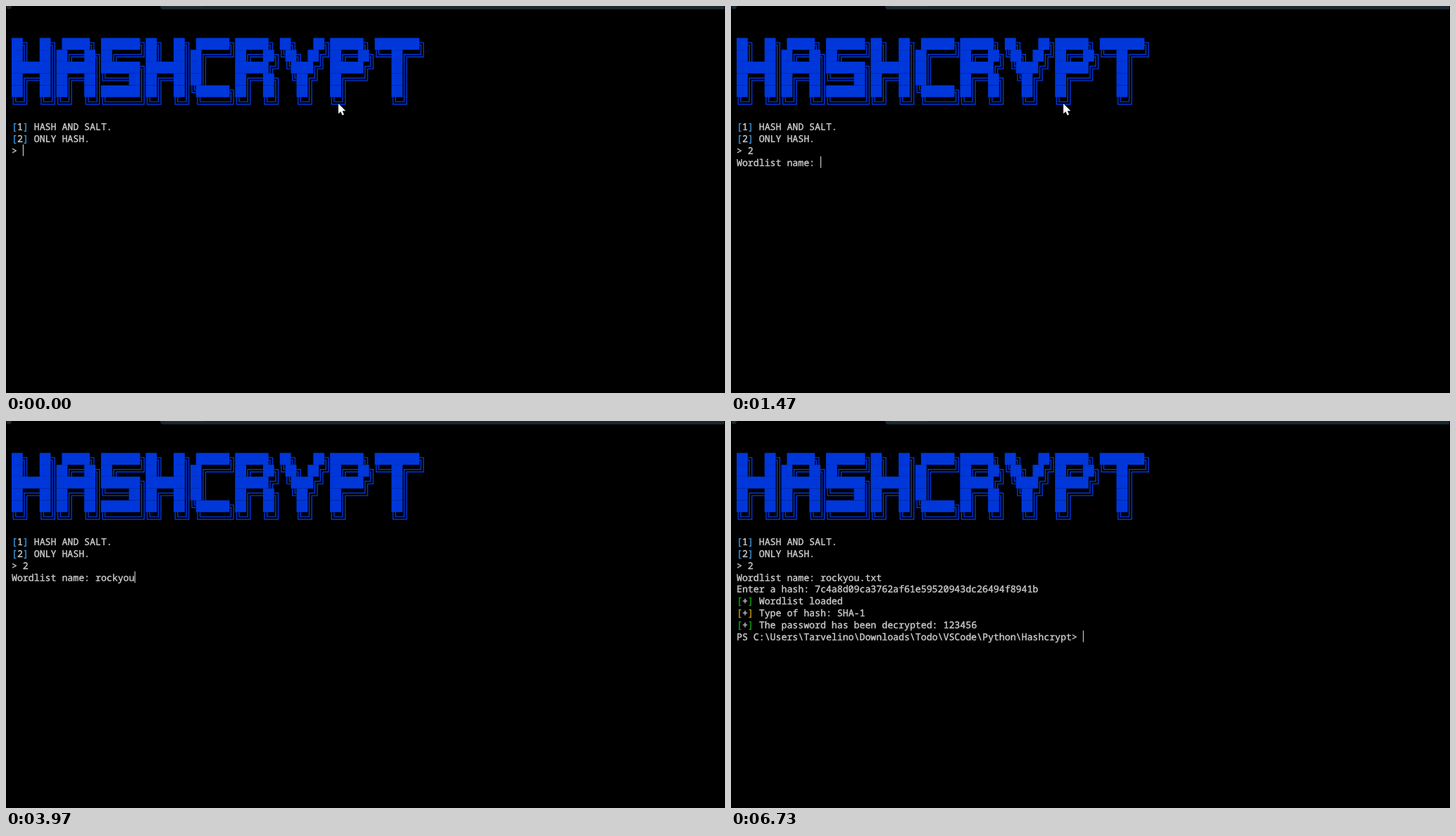
An HTML page for the animation above (6.76 s loop, 1021 by 549 pixels).

```html
<!DOCTYPE html>
<html lang="en">
<head>
<meta charset="utf-8">
<title>Terminal</title>
<style>
html, body { margin: 0; width: 100%; height: 100%; overflow: hidden; background: #000; }
svg { display: block; width: 1021px; height: 549px; }
text {
  font: 500 13.22px "Noto Sans Mono", "DejaVu Sans Mono", monospace;
  font-variant-ligatures: none;
  white-space: pre;
  text-rendering: geometricPrecision;
  fill: #ccc;
  stroke: #ccc;
  stroke-width: .4px;
}
</style>
</head>
<body>
<svg id="stage" viewBox="0 0 1021 549">
  <rect width="1021" height="549"/>
  <path d="M1 0H8Q8 4.5 4 4.5Q1 4.5 1 2ZM219 0H1020V4.8H223Q219 4.8 219 0Z" fill="#1b282d"/>
  <path d="M226 .5H279" stroke="#2c3335"/>
  <g id="banner" fill="#0037da"></g>
  <g id="lines"></g>
  <rect id="caret" width="1.1" height="16.4" fill="#d4d4d4"/>
  <path id="pointer" d="M0 0V14.2L3.3 11.2L5.6 16.6L8 15.5L5.7 10.3H10.2Z"
        fill="#fff" stroke="#000" stroke-width=".8" paint-order="stroke"/>
</svg>
<script>
const LOOP = 6760;
const LEFT = 8, TOP = 45.3, CELL_W = 7.932, CELL_H = 16.8;
const FIRST_ROW = 7, BASELINE = 13.3;

const BANNER = [
  "██╗  ██╗ █████╗ ███████╗██╗  ██╗ ██████╗██████╗ ██╗   ██╗██████╗ ████████╗",
  "██║  ██║██╔══██╗██╔════╝██║  ██║██╔════╝██╔══██╗╚██╗ ██╔╝██╔══██╗╚══██╔══╝",
  "███████║███████║███████╗███████║██║     ██████╔╝ ╚████╔╝ ██████╔╝   ██║",
  "██╔══██║██╔══██║╚════██║██╔══██║██║     ██╔══██╗  ╚██╔╝  ██╔═══╝    ██║",
  "██║  ██║██║  ██║███████║██║  ██║╚██████╗██║  ██║   ██║   ██║        ██║",
  "╚═╝  ╚═╝╚═╝  ╚═╝╚══════╝╚═╝  ╚═╝ ╚═════╝╚═╝  ╚═╝   ╚═╝   ╚═╝        ╚═╝"
];
// Direction of each corner's arms: [horizontal, vertical]
const CORNERS = { "╔": [1, 1], "╗": [-1, 1], "╚": [1, -1], "╝": [-1, -1] };
const LINE_GAP = 1.8;

const CYAN = "#3a96dd", GREEN = "#13a10e", YELLOW = "#c19c00";
const BRACKETS = [CYAN, CYAN, , , , GREEN, YELLOW, GREEN];

// Text added to the terminal: [time, text, ms per character]
const OUTPUT = [
  [0, "[1] HASH AND SALT.\n[2] ONLY HASH.\n> "],
  [910, "2"],
  [1180, "\nWordlist name: "],
  [3240, "rockyou.txt", 110],
  [4690, "\nEnter a hash: "],
  [5760, "7c4a8d09ca3762af61e59520943dc26494f8941b"],
  [6000, "\n"],
  [6060, "[+] Wordlist loaded\n"],
  [6120, "[+] Type of hash: SHA-1\n"],
  [6240, "[+] The password has been decrypted: 123456\n"],
  [6400, "PS C:\\Users\\Tarvelino\\Downloads\\Todo\\VSCode\\Python\\Hashcrypt> "]
];
const POINTER = { from: [472, 138.5], to: [407.7, 302.5], start: 1560, end: 2000, hide: 3240 };

const byId = id => document.getElementById(id);
const cellX = col => LEFT + col * CELL_W;
const cellY = row => TOP + row * CELL_H;

function add(parent, tag, attrs, content = "") {
  const node = document.createElementNS("http://www.w3.org/2000/svg", tag);
  for (const key in attrs) node.setAttribute(key, attrs[key]);
  node.textContent = content;
  return parent.appendChild(node);
}

function boxPath(char, x, y) {
  const cx = x + CELL_W / 2, cy = y + CELL_H / 2;
  return [-LINE_GAP, LINE_GAP].map(d => {
    if (char === "═") return `M${x} ${cy + d}h${CELL_W}`;
    if (char === "║") return `M${cx + d} ${y}v${CELL_H}`;
    const [h, v] = CORNERS[char];
    return `M${cx + h * CELL_W / 2} ${cy + v * d}H${cx + h * d}V${cy + v * CELL_H / 2}`;
  }).join("");
}

function drawBanner() {
  const group = byId("banner");
  let outline = "";
  BANNER.forEach((line, row) => {
    const y = cellY(row);
    for (const { 0: run, index } of line.matchAll(/█+/g))
      add(group, "rect", { x: cellX(index), y, width: run.length * CELL_W, height: CELL_H });
    for (const { 0: char, index } of line.matchAll(/[═║╔╗╚╝]/g))
      outline += boxPath(char, cellX(index), y);
  });
  add(group, "path", { d: outline, fill: "none", stroke: "#0037da", "stroke-width": 1.4 });
}

function terminalText(t) {
  return OUTPUT.filter(([time]) => t >= time).map(([time, text, pace]) =>
    pace ? text.slice(0, 1 + Math.floor((t - time) / pace)) : text).join("");
}

let shown;
function drawText(content) {
  if (content === shown) return;
  shown = content;
  const group = byId("lines"), lines = content.split("\n");
  group.textContent = "";
  lines.forEach((line, i) => {
    const text = add(group, "text", { x: LEFT, y: cellY(FIRST_ROW + i) + BASELINE });
    line.split(/([[\]])/).forEach(part => {
      const color = BRACKETS[i], bracket = part === "[" || part === "]";
      if (part) add(text, "tspan", bracket ? { fill: color, stroke: color } : {}, part);
    });
  });
  const last = lines.length - 1;
  byId("caret").setAttribute("x", cellX(lines[last].length));
  byId("caret").setAttribute("y", cellY(FIRST_ROW + last));
}

function drawPointer(t) {
  const { from, to, start, end, hide } = POINTER;
  const k = Math.min(1, Math.max(0, (t - start) / (end - start)));
  const eased = k * k * (3 - 2 * k);
  const [x, y] = from.map((a, i) => a + (to[i] - a) * eased);
  byId("pointer").setAttribute("transform", `translate(${x} ${y})`);
  byId("pointer").setAttribute("visibility", t < hide ? "visible" : "hidden");
}

const begin = performance.now();
function tick() {
  const t = (performance.now() - begin) % LOOP;
  drawText(terminalText(t));
  drawPointer(t);
  requestAnimationFrame(tick);
}
drawBanner();
tick();
</script>
</body>
</html>
```
